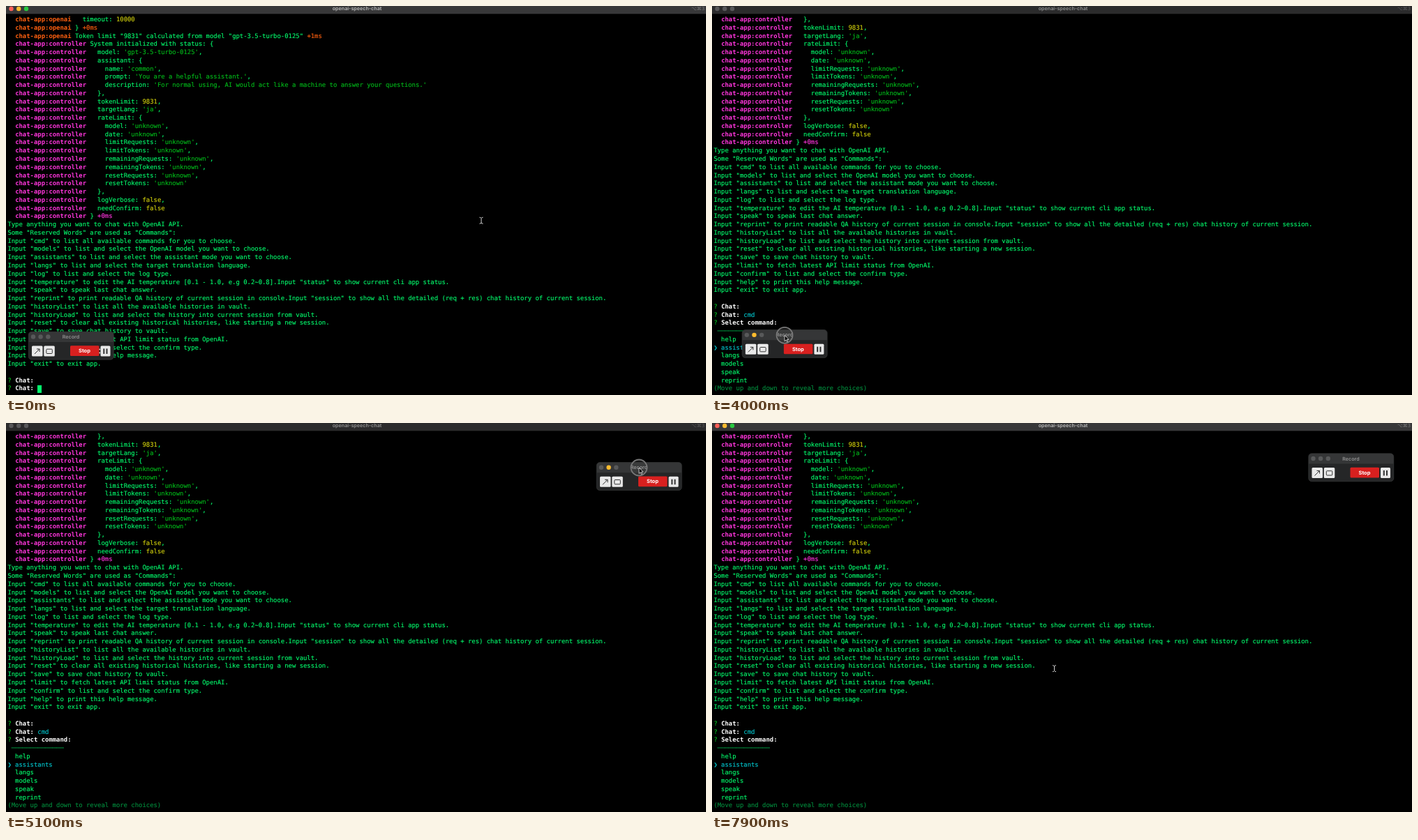
Recreate the animation shown at these times as an HTML page. Size 1003 by 558 pixels, loop 8000 ms.

```html
<!DOCTYPE html>
<html lang="en">
<head>
<meta charset="utf-8">
<title>Terminal chat</title>
<style>
  html, body { margin: 0; width: 100%; height: 100%; overflow: hidden; background: #000; }
  pre {
    position: absolute; left: 2.4px; top: 15px; margin: 0; color: #04fa6c;
    font: 8.925px/11.77px "DejaVu Sans Mono", monospace; text-rendering: geometricPrecision;
    -webkit-text-stroke: .15px;
  }
  b { -webkit-text-stroke: 0; }
  svg { position: absolute; left: 0; top: 0; }
  text { font: 600 7.15px Inter, sans-serif; text-anchor: middle; text-rendering: geometricPrecision; }
  .openai { color: #ff6010; }
  .controller { color: #ff35dc; }
  .str { color: #00b81a; }
  .num { color: #cfce0c; }
  .pick { color: #00c3ca; }
  .dim { color: #008a3c; }
  .white { color: #fff; }
  .block { background: #04fa6c; padding: .75px 0; }
</style>
</head>
<body>
<pre id="screen"></pre>
<svg width="1003" height="558" viewBox="0 0 1003 558">
  <rect id="bar" width="1003" height="11.3"/>
  <g id="lights"><circle cx="7.5" cy="4" r="3.2"/><circle cx="18.2" cy="4" r="3.2"/><circle cx="29" cy="4" r="3.2"/></g>
  <text id="title" x="503" y="6">openai-speech-chat</text>
  <text id="shortcut" x="991.5" y="6" style="font:6.8px 'DejaVu Sans',sans-serif">⌥⌘3</text>

  <g id="recorder">
    <rect x=".25" y=".25" width="122" height="40" rx="4.5" fill="#252627" stroke="#474849" stroke-width=".5"/>
    <path d="M.5 15V5a4.5 4.5 0 0 1 4.5-4.5h112.5a4.5 4.5 0 0 1 4.5 4.5v10z" fill="#353637"/>
    <g fill="#58595a"><circle cx="7" cy="7.5" r="3.2"/><circle id="minimize" cx="17.6" cy="7.5" r="3.2"/><circle cx="28.3" cy="7.5" r="3.2"/></g>
    <text id="caption" x="61" y="10">Record</text>
    <g fill="#e9e9e9">
      <rect x="5" y="20.5" width="15.5" height="15" rx="1.5"/>
      <rect x="22.3" y="20.5" width="15.5" height="15" rx="1.5"/>
      <rect x="103.5" y="20.5" width="14" height="15" rx="1.5"/>
    </g>
    <path d="M9 32l7-7m-4 0h4v4" fill="none" stroke="#333"/>
    <rect x="25.8" y="25.2" width="8.5" height="6.3" rx="1" fill="none" stroke="#333"/>
    <path d="M108.3 24.5v7.5m4.2-7.5v7.5" stroke="#333" stroke-width="2"/>
    <rect x="60" y="20.3" width="41.5" height="14.7" rx="1.5" fill="#d8201f"/>
    <text x="80.5" y="30.2" fill="#fff" style="font-size:7.5px;font-weight:700">Stop</text>
    <path id="colon" d="M101.5 25.5h1.5m-1.5 5h1.5" stroke="#fff" stroke-width="1.5"/>
  </g>

  <g id="pointer">
    <circle id="ring" r="11.5" fill="#444" fill-opacity=".35" stroke="#777" stroke-width="1.8"/>
    <path id="ibeam" d="M-2.5-4.3q2 0 2.5 1.2q.5-1.2 2.5-1.2M0-3.1v6.6M-2.5 4.7q2 0 2.5-1.2q.5 1.2 2.5 1.2" fill="none" stroke="#d5d5d5"/>
    <path id="arrow" d="M0 0v8.5l2-1.8 1.4 2.8 1.3-.7-1.4-2.6h2.7z" fill="#000" stroke="#eee" stroke-width=".8"/>
    <path id="hand" d="M-2.2-4.2q1-1 1.7.2l.8 2.5 3 .8q1.2.5.8 2.2l-.7 3.2h-4.2l-2.6-3.3q-.4-1.3.8-1l1 .6z" fill="#eee" stroke="#222" stroke-width=".5"/>
  </g>
</svg>
<script>
const $ = id => document.getElementById(id);
const LOOP = 8000, STEP = 100, SUBMIT = 600;
const tag = (cls, s) => `<span class="${cls}">${s}</span>`;
const bold = (cls, s) => `<b class="${cls}">${s}</b>`;

const colorValues = s => s.replace(/'[^']*'|\b(?:\d+|false)\b/g, v => tag(v[0] === "'" ? 'str' : 'num', v));
const log = (scope, body, elapsed = '') =>
  `  ${bold(scope, 'chat-app:' + scope)} ${colorValues(body)}${tag(scope, elapsed)}`;
const prompt = (label, rest = '') => `${tag('str', '?')} ${bold('white', label)} ${rest}`;

const status = `  model: 'gpt-3.5-turbo-0125',
  assistant: {
    name: 'common',
    prompt: 'You are a helpful assistant.',
    description: 'For normal using, AI would act like a machine to answer your questions.'
  },
  tokenLimit: 9831,
  targetLang: 'ja',
  rateLimit: {
    model: 'unknown',
    date: 'unknown',
    limitRequests: 'unknown',
    limitTokens: 'unknown',
    remainingRequests: 'unknown',
    remainingTokens: 'unknown',
    resetRequests: 'unknown',
    resetTokens: 'unknown'
  },
  logVerbose: false,
  needConfirm: false`.split('\n');

const help = `Type anything you want to chat with OpenAI API.
Some "Reserved Words" are used as "Commands":
Input "cmd" to list all available commands for you to choose.
Input "models" to list and select the OpenAI model you want to choose.
Input "assistants" to list and select the assistant mode you want to choose.
Input "langs" to list and select the target translation language.
Input "log" to list and select the log type.
Input "temperature" to edit the AI temperature [0.1 - 1.0, e.g 0.2~0.8].Input "status" to show current cli app status.
Input "speak" to speak last chat answer.
Input "reprint" to print readable QA history of current session in console.Input "session" to show all the detailed (req + res) chat history of current session.
Input "historyList" to list all the available histories in vault.
Input "historyLoad" to list and select the history into current session from vault.
Input "reset" to clear all existing historical histories, like starting a new session.
Input "save" to save chat history to vault.
Input "limit" to fetch latest API limit status from OpenAI.
Input "confirm" to list and select the confirm type.
Input "help" to print this help message.
Input "exit" to exit app.`.split('\n');

const history = [
  log('openai', '  timeout: 10000'),
  log('openai', '} ', '+0ms'),
  `  ${bold('openai', 'chat-app:openai')} Token limit "9831" calculated from model "gpt-3.5-turbo-0125" ${tag('openai', '+1ms')}`,
  log('controller', 'System initialized with status: {'),
  ...status.map(s => log('controller', s)),
  log('controller', '} ', '+0ms'),
  ...help, '', prompt('Chat:')
];

const choices = ['help', 'assistants', 'langs', 'models', 'speak', 'reprint', 'session'];
const separator = tag('dim', '─'.repeat(14));

function menu(t) {
  const active = t < 1400 ? 0 : t < 1800 ? 1 : t < 2200 ? 2 : 1;
  const rows = choices.map((c, i) => i === active ? tag('pick', '❯ ' + c) : '  ' + c);
  if (t >= 2200) {
    rows.pop();
    rows.unshift(' ' + separator);
  }
  return [
    prompt('Select command:', t < 1400 ? tag('dim', '(Use arrow keys)') : ''),
    ...rows,
    tag('dim', '(Move up and down to reveal more choices)')
  ];
}

function screenText(t) {
  const typed = 'cmd'.slice(0, Math.max(0, Math.floor(t / 100) - 2));
  const lines = t < SUBMIT
    ? [...history, prompt('Chat:', typed + tag('block', ' '))]
    : [...history, prompt('Chat:', tag('pick', 'cmd')), ...menu(t)];
  return lines.slice(-46).join('\n');
}

const easeIn = p => p * p, easeOut = p => p * (2 - p), smooth = p => p * p * (3 - 2 * p);

// Keys are [time, x, y, easing towards this key].
function along(keys, t) {
  const i = keys.findIndex(k => k[0] > t);
  if (i < 0) return keys[keys.length - 1].slice(1, 3);
  if (i === 0) return keys[0].slice(1, 3);
  const [t0, x0, y0] = keys[i - 1], [t1, x1, y1, ease] = keys[i];
  const p = ease((t - t0) / (t1 - t0));
  return [x0 + (x1 - x0) * p, y0 + (y1 - y0) * p];
}

const windowPath = [[3900, 32, 467], [4600, 565, 337, easeIn], [5100, 846, 56.3, easeOut], [5400, 854.5, 43.5, smooth]];
const pointerPath = [
  [300, 681, 307.5], [301, 631, 322, smooth], [2900, 631, 322, smooth], [3700, 93, 475, smooth],
  [3900, 93, 475, smooth], [4600, 634, 342.5, easeIn], [5100, 907, 64, easeOut], [5400, 915.5, 51.5, smooth],
  [5500, 915.5, 51.5, smooth], [5900, 495, 354.5, smooth], [6600, 490.5, 352, smooth]
];

const show = (id, on) => $(id).style.display = on ? '' : 'none';
const fill = (id, color) => $(id).setAttribute('fill', color);
const move = (id, [x, y]) => $(id).setAttribute('transform', `translate(${x} ${y})`);
let shown;

function draw(t) {
  const text = screenText(t);
  if (text !== shown) $('screen').innerHTML = shown = text;

  const recorderActive = t >= 3900 && t < 6300;
  fill('bar', recorderActive ? '#2b2b2c' : '#383839');
  fill('title', recorderActive ? '#929292' : '#bcbcbc');
  fill('shortcut', recorderActive ? '#5c5c5c' : '#7c7c7c');
  ['#ff5f57', '#febc2e', '#28c840'].forEach((c, i) =>
    $('lights').children[i].setAttribute('fill', recorderActive ? '#58585a' : c));
  fill('minimize', recorderActive ? '#febc2e' : '#58595a');
  fill('caption', recorderActive ? '#c2c2c2' : '#929292');
  show('colon', t < 3900);
  move('recorder', along(windowPath, t));

  const dragging = t >= 3900 && t < 5500;
  const arrow = t >= 3600 && t < 5500, hand = t >= 5500 && t < 6100;
  show('pointer', t < 300 || t >= 2900);
  show('ring', dragging);
  show('arrow', arrow);
  show('hand', hand);
  show('ibeam', !arrow && !hand);
  move('pointer', along(pointerPath, t));
}

function tick() {
  draw(Math.floor(performance.now() % LOOP / STEP) * STEP);
  requestAnimationFrame(tick);
}
tick();
</script>
</body>
</html>
```
